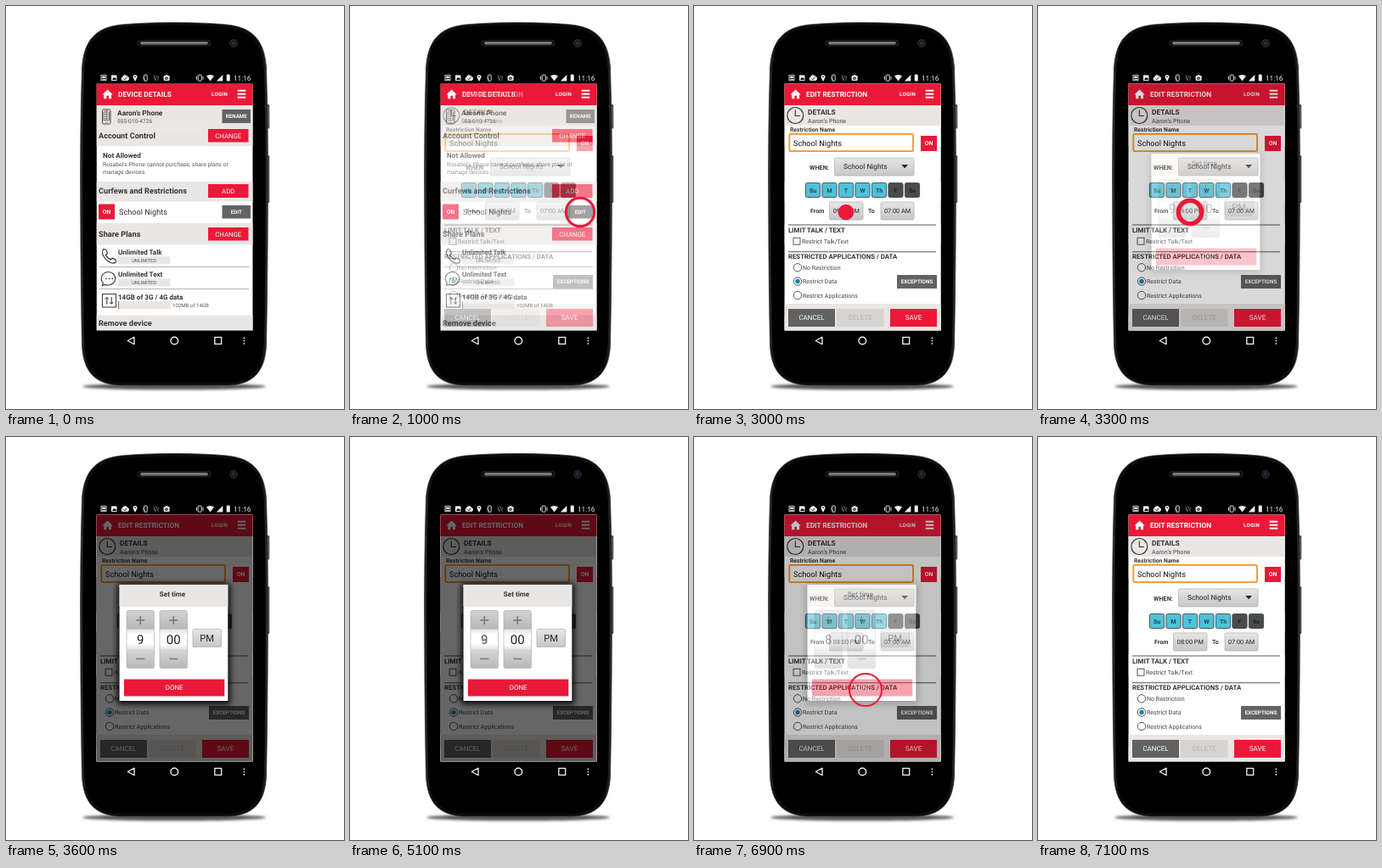
Animation of 398 by 475 pixels, one loop 8000 ms. Source, as an HTML page:

```html
<!DOCTYPE html>
<html lang="en">
<head>
<meta charset="utf-8">
<title>Restriction settings</title>
<style>
html, body { margin: 0; width: 100%; height: 100%; overflow: hidden; background: #fff; }
svg { display: block; width: 100%; height: 100%; }
text { font-family: Roboto, Arial, sans-serif; text-rendering: geometricPrecision; white-space: pre; }
</style>
</head>
<body>
<svg id="stage" viewBox="0 0 398 475" xmlns="http://www.w3.org/2000/svg"></svg>
<script>
const RED = '#eb1938', INK = '#333', BAND = '#e9e6e4', GREY = '#636363';
const LEFT = 106.5, RIGHT = 290.7, TOP = 91.4, BOTTOM = 382.6;
const stage = document.getElementById('stage');

// Drawing helpers return SVG markup; boxes are given by their edges.
const box = (x1, y1, x2, y2, fill, more = '') =>
  `<rect x="${x1}" y="${y1}" width="${x2 - x1}" height="${y2 - y1}" fill="${fill}" ${more}/>`;
const band = (y1, y2, fill = BAND, more) => box(LEFT, y1, RIGHT, y2, fill, more);
const text = (x, y, size, str, { bold, fill = INK, mid, id } = {}) =>
  `<text x="${x}" y="${y}" font-size="${size}" fill="${fill}" font-weight="${bold ? 700 : 400}"` +
  `${mid ? ' text-anchor="middle"' : ''}${id ? ` id="${id}"` : ''}>${str}</text>`;
const bold = (x, y, size, str, fill) => text(x, y, size, str, { bold: true, fill });
const line = (d, stroke, width = 1, more = '') =>
  `<path d="${d}" fill="none" stroke="${stroke}" stroke-width="${width}" ${more}/>`;
const shape = (d, fill, more = '') => `<path d="${d}" fill="${fill}" ${more}/>`;
const disc = (x, y, r, fill, more = '') => `<circle cx="${x}" cy="${y}" r="${r}" fill="${fill}" ${more}/>`;
const button = (x1, y1, x2, y2, label, size, opt = {}) =>
  box(x1, y1, x2, y2, opt.bg || RED) +
  text((x1 + x2) / 2, (y1 + y2) / 2 + size * 0.36, size, label, { fill: '#fff', mid: true, ...opt });
const softButton = (x1, y1, x2, y2) => box(x1, y1, x2, y2, 'url(#soft)', 'rx="1.5" stroke="#b5b5b5" stroke-width=".8"');

const defs = `<defs>
  <linearGradient id="soft" x2="0" y2="1"><stop stop-color="#e6e6e6"/><stop offset="1" stop-color="#c6c6c6"/></linearGradient>
  <linearGradient id="spin" x2="0" y2="1"><stop stop-color="#d2d2d2"/><stop offset=".32" stop-color="#b8b8b8"/>
    <stop offset=".33" stop-color="#e4e4e4"/><stop offset=".42" stop-color="#fff"/><stop offset=".58" stop-color="#fff"/>
    <stop offset=".67" stop-color="#e4e4e4"/><stop offset=".68" stop-color="#d6d6d6"/><stop offset="1" stop-color="#b8b8b8"/></linearGradient>
  <linearGradient id="rim"><stop stop-color="#2c2c2c"/><stop offset=".04" stop-color="#0c0c0c"/>
    <stop offset=".96" stop-color="#0c0c0c"/><stop offset="1" stop-color="#2c2c2c"/></linearGradient>
  <filter id="blur" x="-20%" y="-300%" width="140%" height="700%"><feGaussianBlur stdDeviation="1.8"/></filter>
  <filter id="shade" x="-20%" y="-20%" width="140%" height="140%"><feGaussianBlur stdDeviation="3.5"/></filter>
  <clipPath id="view">${box(LEFT, TOP, RIGHT, BOTTOM, '#000')}</clipPath>
</defs>`;

function phone() {
  const body = 'M198 19.5Q236 19.5 260 22C290 25 304 40 306.5 72Q309 150 308.3 240Q308 330 306.5 400' +
    'C305 430 292 446 262 447H134C104 446 91 430 89.5 400Q88 330 87.7 240Q87 150 89.5 72C92 40 106 25 136 22Q160 19.5 198 19.5Z';
  return '<ellipse cx="198" cy="448.5" rx="108" ry="3.8" fill="#555" filter="url(#blur)"/>' +
    box(305, 116, 310.3, 144.5, '#4a4a4a', 'rx="1.5"') + box(305, 176, 310.3, 232, '#4a4a4a', 'rx="1.5"') +
    line('M309.3 118V142.5M309.3 178V230', '#777', .7) +
    shape(body, 'url(#rim)', 'stroke="#2c2c2c" stroke-width=".7"') +
    shape(body, '#000', 'transform="translate(198 235) scale(.975 .985) translate(-198 -235)"') +
    box(155, 40.5, 241, 47, '#0c0c0c', 'rx="3" stroke="#333" stroke-width=".7"') +
    box(158, 42, 238, 45.6, '#777', 'rx="1.8"') +
    disc(268, 44, 4.4, '#1b1b22', 'stroke="#2c2c30"') + disc(268, 44, 1.8, '#26334c') +
    box(106, 77, 291, 409, '#000');
}

function systemBars() {
  const w = '#f2f2f2';
  return box(112, 81.7, 118, 87.7, 'none', `stroke="${w}" stroke-width=".9"`) + box(113.2, 82.8, 117, 85.2, w) +
    line('M113.2 86.5H117', w, .8) +
    box(124, 81.5, 130.5, 88, w) + shape('M125 87L127 84L128.3 85.5L129.2 84.5L130 87Z', '#000') +
    shape('M137 88A2.4 2.4 0 0 1 137 83.7A3.4 3.4 0 0 1 143.3 83.2A2.5 2.5 0 0 1 143.3 88Z', w) +
    line('M138.2 85.4L139.7 86.9L142.3 84', '#000', .9) +
    shape('M152 89L149.8 84.7A2.5 2.5 0 1 1 154.2 84.7Z', w) + disc(152, 83.4, .8, '#000') +
    box(162.6, 81.2, 166.2, 88.3, 'none', `stroke="${w}" stroke-width=".9" rx=".8"`) + line('M161.5 84.3L163.8 87.6', w, .8) +
    line('M174 81.5L177 88M176.5 81.5L179.6 88M173.7 84L176 88M179 82.3L180 85', '#999', .7) +
    box(185.6, 82.3, 192.6, 88, w, 'rx="1"') + box(187.7, 81.2, 190.5, 83, w) + disc(189, 85.2, 1.7, '#000') + disc(189, 85.2, .8, w) +
    box(226.2, 81.3, 230.2, 88.2, 'none', `stroke="${w}" stroke-width=".9" rx=".6"`) +
    line('M224.5 82.8V86.8M232 82.8V86.8', w, .9) +
    shape('M236 82.6Q240.5 79.2 245 82.6L240.5 88.5Z', w) +
    shape('M247.8 88.5H255.3V81Z', w) +
    box(259.7, 81.2, 263.7, 88.5, w) + box(260.8, 80.3, 262.6, 81.5, w) +
    text(268, 88, 8.2, '11:16', { fill: w }) +
    line('M151 390.3V398.7L143.3 394.5Z', w, 1.3, 'stroke-linejoin="round"') +
    disc(198.3, 394.5, 4.3, 'none', `stroke="${w}" stroke-width="1.4"`) +
    box(245.8, 390.5, 253.6, 398.4, 'none', `stroke="${w}" stroke-width="1.3"`) +
    [391.3, 394.6, 397.9].map(y => disc(280.4, y, .9, w)).join('');
}

const header = title =>
  band(TOP, 117, RED) +
  shape('M113.5 104.6L119.6 98.6L125.7 104.6H124V109.3H121V105.8H118.4V109.3H115.2V104.6Z', '#fff') +
  bold(132, 107.3, 8.35, title, '#fff') +
  text(242, 106, 6.1, 'LOGIN', { bold: true, fill: '#fff' }).replace('<text', '<text letter-spacing=".3"') +
  line('M272.7 99.7H282.2M272.7 103.7H282.2M272.7 107.7H282.2', '#fff', 1.9);

function planRow(y, name) {
  return bold(132, y, 8.05, name) + box(132, y + 2.3, 193.5, y + 11.3, BAND);
}

function detailsScreen() {
  return band(TOP, BOTTOM, '#fff') + header('DEVICE DETAILS') +
    band(117, 165) + band(207, 230.5) + band(256, 281.5) + band(364.5, BOTTOM) +
    line('M106.5 144H236', '#f3f1f0', .7) +
    box(113.5, 122, 123, 139, 'none', 'rx="1.5" stroke="#444"') + box(115, 125, 121.5, 134.5, 'none', 'stroke="#555" stroke-width=".8"') +
    line('M116 127.5H120.5M116 130H120.5M116 132.5H120.5M118.2 125V134M116.5 123.6H120M117.2 137H119.5', '#555', .7) +
    bold(131, 128.7, 8.4, 'Aaron’s Phone') + text(131, 138, 6.7, '555-010-4726', { fill: '#555' }) +
    button(254.5, 122, 288, 138, 'RENAME', 6.2, { bg: GREY, bold: true }) +
    bold(109, 156.3, 9.2, 'Account Control') + button(238, 145, 285.5, 160.5, 'CHANGE', 7.8) +
    bold(114, 179, 8.2, 'Not Allowed') +
    text(114, 189.2, 6.8, 'Rosabel’s Phone cannot purchase, share plans or', { fill: '#555' }) +
    text(114, 197.7, 6.8, 'manage devices.', { fill: '#555' }) +
    bold(109, 221.3, 9.2, 'Curfews and Restrictions') + button(238, 210, 285.5, 226, 'ADD', 7.8) +
    button(109, 233.5, 128, 251.5, 'ON', 6.9, { bold: true }) +
    text(133, 246, 9.2, 'School Nights') + button(254.5, 235, 288, 250.5, 'EDIT', 6.2, { bg: GREY, bold: true }) +
    bold(109, 272, 9.2, 'Share Plans') + button(238, 261, 285.5, 276.5, 'CHANGE', 7.8) +
    planRow(293, 'Unlimited Talk') + planRow(319, 'Unlimited Text') + planRow(345.7, '14GB of 3G / 4G data') +
    [302, 328].map(y => text(162.5, y, 5.6, 'UNLIMITED', { mid: true, fill: '#555' })).join('') +
    line('M132.5 348V357', '#777') + text(196, 355, 6.1, '102MB of 14GB', { fill: '#555' }) +
    line('M110 307.5H286M110 333.5H286', '#aaa', .9) +
    line('M115 286.5L117.8 287.2L119.5 291.5L117.5 293.3Q119 297.2 123.3 299L125.2 297L129.2 299.2L129.3 302Q127 304 123 302.5Q116 299 113.4 291.5Q113 288.5 115 286.5Z', '#333', 1.1) +
    line('M115.2 328.8L113.5 329.5L114.3 326.3A8.2 7.7 0 1 1 117.5 328.4Z', '#333', 1.1) +
    [117.8, 121.5, 125.2].map(x => disc(x, 321.3, .9, INK)).join('') +
    box(113.5, 339.5, 129.5, 355, 'none', 'stroke="#444" stroke-width="1.1"') +
    line('M118.8 351.5V343.5M116.9 345.6L118.8 343.2L120.7 345.6M124.3 343V351M122.4 348.9L124.3 351.3L126.2 348.9', '#333') +
    bold(109, 377, 9.2, 'Remove device');
}

function dayButton(name, i) {
  const x = 140 + i * 19.5, on = i < 5;
  return box(x - 8.6, 208.5, x + 8.6, 225.5, on ? '#4fc1d9' : '#4b4b4b', 'rx="2" stroke="#3c4a4e" stroke-width=".9"') +
    text(x, 219.8, 6.9, name, { bold: true, mid: true, fill: on ? '#24424b' : '#222' });
}

function radio(y, label, on) {
  return disc(122, y, 4.7, '#fff', 'stroke="#444" stroke-width=".9"') +
    (on ? disc(122, y, 2.8, '#1b87b4') : '') + text(128, y + 2.8, 7.05, label, { fill: '#444' });
}

function editScreen() {
  return band(TOP, BOTTOM, '#fff') + header('EDIT RESTRICTION') + band(117, 141) +
    disc(119.3, 129, 9.5, 'none', 'stroke="#333" stroke-width="1.2"') + line('M119.3 122.5V129.5H125', '#333', 1.1) +
    bold(134, 127.6, 8.4, 'DETAILS') + text(134, 137.7, 7.1, 'Aaron’s Phone', { fill: '#444' }) +
    bold(113, 147.8, 6.8, 'Restriction Name') +
    box(112.3, 150.8, 258, 171.2, '#fff', 'rx="1.5" stroke="#f6941d" stroke-width="1.8"') +
    text(117, 164.6, 9.2, 'School Nights', { fill: '#111' }) +
    button(267, 153, 286, 171, 'ON', 6.9, { bold: true }) +
    bold(136, 192.5, 7.3, 'WHEN:') + softButton(165.5, 179, 259, 200) +
    text(176, 192.2, 8.3, 'School Nights', { fill: '#222' }) + shape('M244.3 187H252L248.1 191.3Z', '#222') +
    ['Su', 'M', 'T', 'W', 'Th', 'F', 'Sa'].map(dayButton).join('') +
    bold(137, 243.5, 7.1, 'From') + softButton(159.5, 231, 199, 252) +
    text(179.3, 243.7, 7.3, '09:00 PM', { mid: true, fill: '#222', id: 'from' }) +
    bold(205, 243.5, 7.1, 'To') + softButton(220, 231, 259, 252) +
    text(239.5, 243.7, 7.3, '07:00 AM', { mid: true, fill: '#222' }) +
    line('M111 258H285M111 289.7H285', '#555', 1.1) +
    bold(111, 267.3, 7.9, 'LIMIT TALK / TEXT') +
    box(117, 273.2, 125, 281.2, '#fff', 'stroke="#444" stroke-width=".9"') +
    text(127, 280, 7.05, 'Restrict Talk/Text', { fill: '#444' }) +
    bold(111, 298.4, 7.8, 'RESTRICTED APPLICATIONS / DATA') +
    radio(308.3, 'No Restriction') + radio(324.5, 'Restrict Data', true) + radio(341, 'Restrict Applications') +
    button(239, 317, 286, 333, 'EXCEPTIONS', 6.3, { bg: GREY, bold: true }) +
    band(351, BOTTOM) +
    button(111, 357, 166, 378, 'CANCEL', 8, { bg: '#626262' }) +
    button(168, 357, 223.5, 378, 'DELETE', 8, { bg: '#d7d5d3', fill: '#b3b1b0' }) +
    button(231, 357, 286, 378, 'SAVE', 8.2);
}

function spinner(x, values) {
  const c = x + 16.3;
  return box(x, 204.5, x + 32.5, 272.5, 'url(#spin)', 'rx="2" stroke="#b4b4b4" stroke-width=".7"') +
    line(`M${c - 5} 216H${c + 5}M${c} 211V221M${c - 5} 261.5H${c + 5}`, '#777', 1.6) + values(c);
}

function dialog() {
  const value = { mid: true, fill: '#222' };
  return band(TOP, BOTTOM, '#000', 'opacity=".6"') +
    box(131, 173, 264, 315, '#000', 'opacity=".9" filter="url(#shade)"') +
    box(133.6, 174, 261.3, 311, '#fff') + box(133.6, 174, 261.3, 200, BAND) +
    text(196, 188.2, 8.1, 'Set time', { bold: true, mid: true }) +
    spinner(142, c => text(c, 244, 15, '9', { ...value, id: 'nine' }) + text(c, 244, 15, '8', { ...value, id: 'eight' })) +
    spinner(181, c => text(c, 244, 15, '00', value)) +
    softButton(220, 226.5, 253.5, 247.5) + text(236.7, 241.3, 11.2, 'PM', value) +
    button(139, 285.5, 257.3, 305.5, 'DONE', 8);
}

stage.innerHTML = defs + phone() + systemBars() +
  `<g clip-path="url(#view)"><g id="details">${detailsScreen()}</g><g id="edit">${editScreen()}</g>` +
  `<g id="dialog">${dialog()}</g></g><circle id="tap"/>`;

const el = id => document.getElementById(id);
const parts = Object.fromEntries(['edit', 'dialog', 'nine', 'eight', 'from', 'tap'].map(id => [id, el(id)]));
const ramp = (t, from, to) => Math.min(1, Math.max(0, (t - from) / (to - from)));
const fade = (node, a) => {
  node.setAttribute('opacity', a);
  node.setAttribute('visibility', a > 0 ? 'visible' : 'hidden');
};

const LOOP = 8000, STEP = 100;
const taps = [
  { at: 500, span: 800, x: 271, y: 243 },
  { at: 3000, span: 600, x: 179, y: 243 },
  { at: 6300, span: 800, x: 202, y: 298 }
];

// A solid dot opens into a thin ring, which then fades.
function drawTap(t) {
  const tap = taps.find(p => t >= p.at && t < p.at + p.span);
  if (!tap) return fade(parts.tap, 0);
  const p = (t - tap.at) / tap.span, open = ramp(p, 0, .75);
  const outer = 9.3 + 10.7 * open, width = Math.max(2, outer * (1 - open));
  const attrs = { cx: tap.x, cy: tap.y, r: outer - width / 2, fill: 'none', stroke: RED, 'stroke-width': width };
  for (const k in attrs) parts.tap.setAttribute(k, attrs[k]);
  fade(parts.tap, 1 - ramp(p, .75, 1));
}

function draw(now) {
  const t = Math.floor((now % LOOP) / STEP) * STEP;
  fade(parts.edit, ramp(t, 800, 1300));
  fade(parts.dialog, t < 6000 ? ramp(t, 3200, 3600) : 1 - ramp(t, 6600, 7100));
  const change = ramp(t, 5000, 5300), open = t >= 3300 && t < 7100;
  fade(parts.nine, open ? 1 - change : 0);
  fade(parts.eight, open ? change : 0);
  parts.from.textContent = t < 5300 ? '09:00 PM' : '08:00 PM';
  drawTap(t);
}

const start = performance.now();
function tick() {
  draw(performance.now() - start);
  requestAnimationFrame(tick);
}
tick();
</script>
</body>
</html>
```
